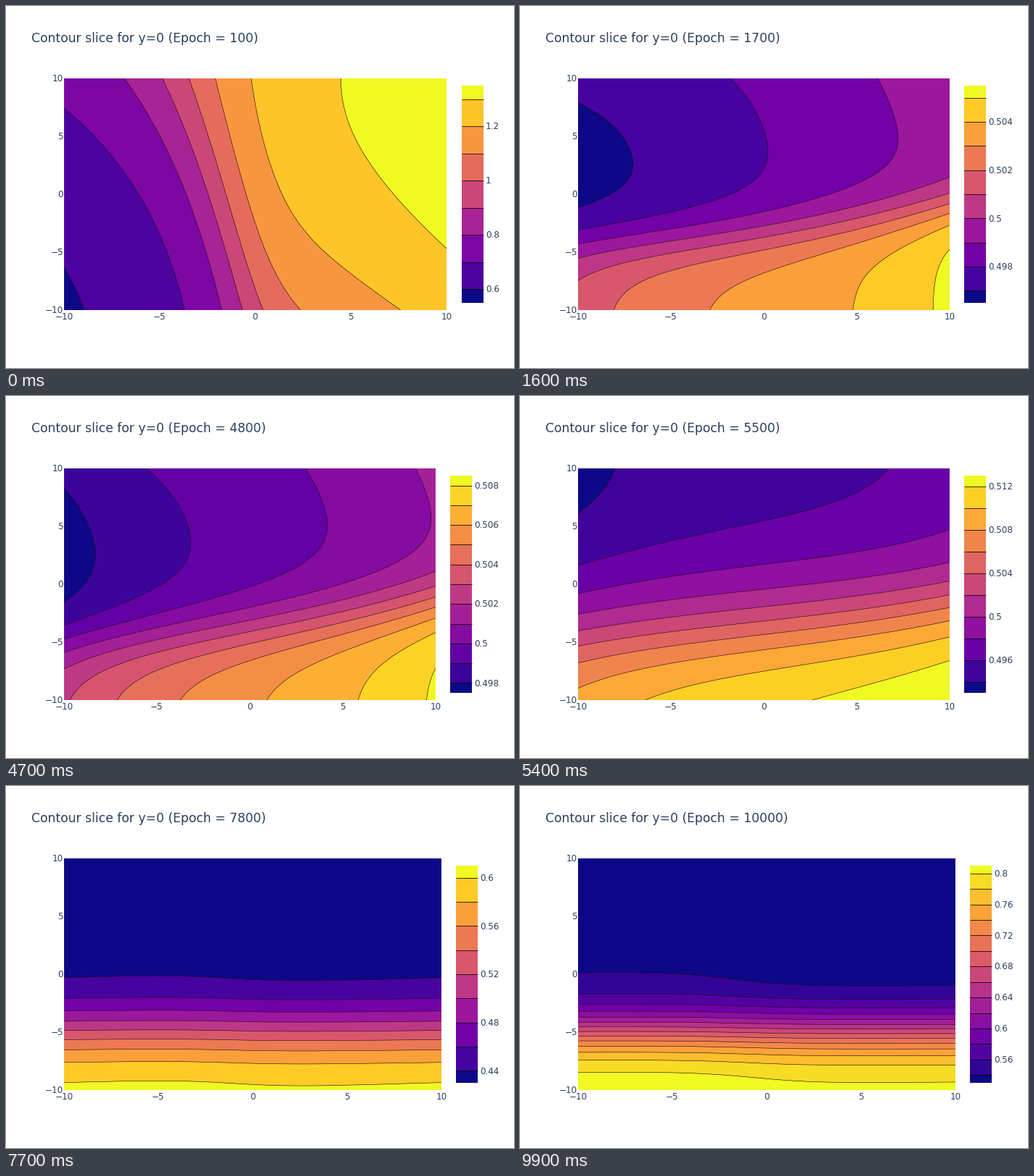
Write a matplotlib script that moves like this. It is 700 by 500 pixels and loops after 10 s.

```python
import numpy as np
import matplotlib.pyplot as plt
from matplotlib.animation import FuncAnimation
from matplotlib.colors import LinearSegmentedColormap
from matplotlib.patches import Rectangle

FRAMES, INTERVAL = 100, 100
LEFT, TOP, BOTTOM = 80, 100, 420
INK = "#2a3f5f"
PLASMA = LinearSegmentedColormap.from_list("plasma10", [
    "#0d0887", "#46039f", "#7201a8", "#9c179e", "#bd3786",
    "#d8576b", "#ed7953", "#fb9f3a", "#fdca26", "#f0f921"], N=1024)

U = np.linspace(0, 1, 105)
PY = np.linspace(TOP, BOTTOM, 321)
P = 2 * U[None] - 1                  # left to right, -1 to 1
Y = PY[:, None]
Q = (Y - 260) / 160                  # top to bottom, -1 to 1


def sigmoid(t):
    return 1 / (1 + np.exp(-t))


def cliff():
    """Steep rise from left to right, leaning along the height."""
    x = 343.5 + 263.5 * P - (294 + 36 * Q - 4 * Q**2)
    floor = .745 - .025 * Q + .015 * Q**2
    gain = .435 - .055 * Q - .05 * Q**2
    spread = 30 - 9 * Q + 5 * Q**2
    return floor + (.0005 + .00012 * Q) * x + gain * sigmoid(x / spread)


def fan(floor, gain, centre, spread, rise):
    """Slanted step; each argument is a polynomial along the width."""
    floor, gain, centre, spread, rise = (
        np.polyval(c, P) for c in (floor, gain, centre, spread, rise))
    z = floor + gain * sigmoid((Y - centre) / spread)
    return .49 + .001 * (z + rise * np.clip(-Q, 0, None) ** 2)


def step(floor, gain, centre, spread, ripple=0):
    """Level step from top to bottom."""
    return floor + gain * sigmoid((Y - centre) / spread) - ripple


def swell(amp, lean):
    return amp * (np.tanh((P + .12) / .33) - lean * P)


slanted = fan([1.4, 7.9], [.8, 0, -.3, 5.5], [-11, -26, 314], [-1.5, 21.5],
              [.25, -.25, .3])
spread_out = fan([.4, -.2, 1.3, 9.35], [.3, -.1, .55, 6.6], [-7, -28, 320],
                 [25.5], [.3, -.2, .3])

# time, field, easing towards the next field
KEYS = [
    (0, cliff(), lambda u: 1 - max(1 - u * 16 / 11, 0) ** 4),
    (16, slanted, lambda u: u ** 3),
    (47, spread_out, lambda u: u ** 3.5),
    (61, step(.441, .148, 295, 64.75, -.0023 * (.35 * P + .8 * P**3)),
     lambda u: u),
    (77, step(.4243, .192, 337.8, 30.2, swell(.0037, 1)), lambda u: u),
    (88, step(.4218, .2, 341, 27.5, swell(.0053, 1)), lambda u: u),
    (99, step(.527, .29, 338, 22.8, swell(.0058, .2)), None),
]


def field(i):
    for (t0, a, ease), (t1, b, _) in zip(KEYS, KEYS[1:]):
        if i <= t1:
            return a + (b - a) * ease((i - t0) / (t1 - t0))


def level_steps(lo, hi):
    """Round step size and the integer multiples of it inside the range."""
    raw = (hi - lo) / 15
    mag = 10 ** np.floor(np.log10(raw))
    size = mag * next(m for m in (1, 2, 5, 10) if raw <= m * mag * (1 + 1e-9))
    return size, np.arange(np.ceil(lo / size), np.floor(hi / size) + 1)


fig = plt.figure(figsize=(7, 5), dpi=100, facecolor="white")
ax = fig.add_axes([0, 0, 1, 1])


def px(size):
    return size * 72 / fig.dpi


def label(x, y, text, size=12, ha="left"):
    ax.text(x, y, text, fontsize=px(size), ha=ha, va="baseline", color=INK,
            family="DejaVu Sans")


def box(x, y, w, h, color):
    ax.add_patch(Rectangle((x, y), w, h, fc=color, lw=0, antialiased=False))


def draw_plot(z, levels, colors, width):
    xs = LEFT + width * U
    box(LEFT, TOP, width, BOTTOM - TOP, colors[len(colors) // 2])
    ax.contourf(xs, PY, z, [z.min() - 1, *levels, z.max() + 1],
                colors=colors, antialiased=True)
    ax.contour(xs, PY, z, levels, colors="black", linewidths=px(.5))


def draw_bar(x, colors, names):
    n = len(names)
    ys = 410 - 300 / n * (np.arange(n) + .5)
    edges = [410, *ys, 110]
    for low, high, color in zip(edges, edges[1:], colors):
        box(x, high, 30, low - high, color)
    for y, name in zip(ys, names):
        ax.plot([x, x + 30], [y, y], color="black", lw=px(.75),
                solid_capstyle="butt")
        label(x + 32.8, y + 4.2, name)


def draw(i):
    ax.clear()
    z = field(i)
    size, ks = level_steps(z.min(), z.max())
    n = len(ks)
    colors = [PLASMA(j / n) for j in range(n + 1)]
    names = [f"{k * size:.6g}" if k % 2 == 0 else "" for k in ks]
    # longer labels leave less room for the plot
    width = round(527 - 7.5 * (max(map(len, names)) - 3))

    draw_plot(z, ks * size, colors, width)
    draw_bar(round(90 + 1.02 * width), colors, names)
    for v in range(-10, 11, 5):
        text = str(v).replace("-", "\u2212")
        label(LEFT + width * (v + 10) / 20, 433, text, ha="center")
        label(LEFT - 1, 260 - 16 * v + 4.2, text, ha="right")
    label(35, 50, f"Contour slice for y=0 (Epoch = {100 * (i + 1)})", 17.15)

    ax.set(xlim=(0, 700), ylim=(500, 0))
    ax.axis("off")
    return []


anim = FuncAnimation(fig, draw, frames=FRAMES, interval=INTERVAL, repeat=True,
                     repeat_delay=0, cache_frame_data=False)
plt.show()
```
